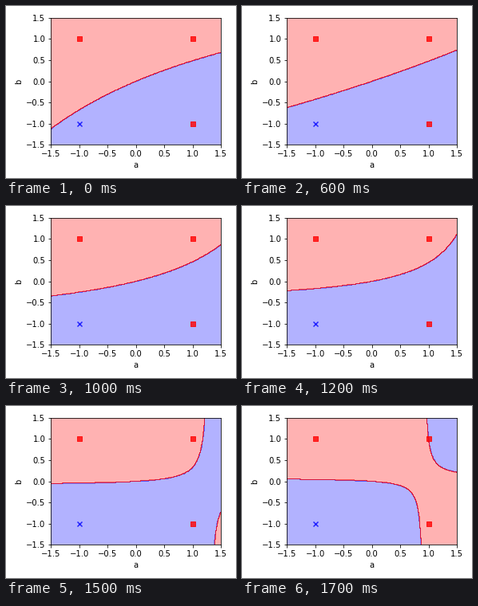
A matplotlib script for the animation above (1900 ms loop, 288 px wide and 216 px high).

```python
import numpy as np
import matplotlib.pyplot as plt
from matplotlib.animation import FuncAnimation

W, H, DPI = 288, 216, 72
STEPS, HOLD = 18, 1
LIM = 1.5

plt.rcParams["font.family"] = "DejaVu Sans"
plt.rcParams["font.size"] = 10

fig = plt.figure(figsize=(W / DPI, H / DPI), dpi=DPI, facecolor="white")
left, right, bottom, top = 56.3, 269.0, 41.6, 201.2
ax = fig.add_axes([left / W, bottom / H, (right - left) / W, (top - bottom) / H])

ticks = np.arange(-LIM, LIM + 0.1, 0.5)
ax.set(xlim=(-LIM, LIM), ylim=(-LIM, LIM), xticks=ticks, yticks=ticks,
       xlabel="a", ylabel="b")
ax.autoscale(False)

ax.scatter([-1], [-1], c="blue", marker="x", alpha=0.8, zorder=1.5)
ax.scatter([-1, 1, 1], [1, -1, 1], c="red", marker="s", alpha=0.8, zorder=1.5)

xx, yy = np.meshgrid(np.linspace(-LIM, LIM, W), np.linspace(-LIM, LIM, H))
# Several translucent bands meet at the jump, which darkens the boundary.
levels = 0.15 * np.arange(8)
band_colors = ["blue"] * 3 + ["red"] * 4
regions = []


def predict(step):
    """Class of every grid point; the weights change linearly while learning."""
    wa = -0.564 + 0.03528 * step
    wb = 1 - 0.0359 * step
    wab = 0.163 - 0.0346 * step
    return (wa * xx + wb * yy + wab * xx * yy > 0).astype(float)


def draw(i):
    while regions:
        regions.pop().remove()
    step = min(i, STEPS - 1)
    regions.append(ax.contourf(xx, yy, predict(step), levels=levels,
                               colors=band_colors, alpha=0.3, zorder=0.5))
    return []


anim = FuncAnimation(fig, draw, frames=STEPS + HOLD, interval=100,
                     init_func=lambda: [], repeat=True, repeat_delay=0)
plt.show()
```
